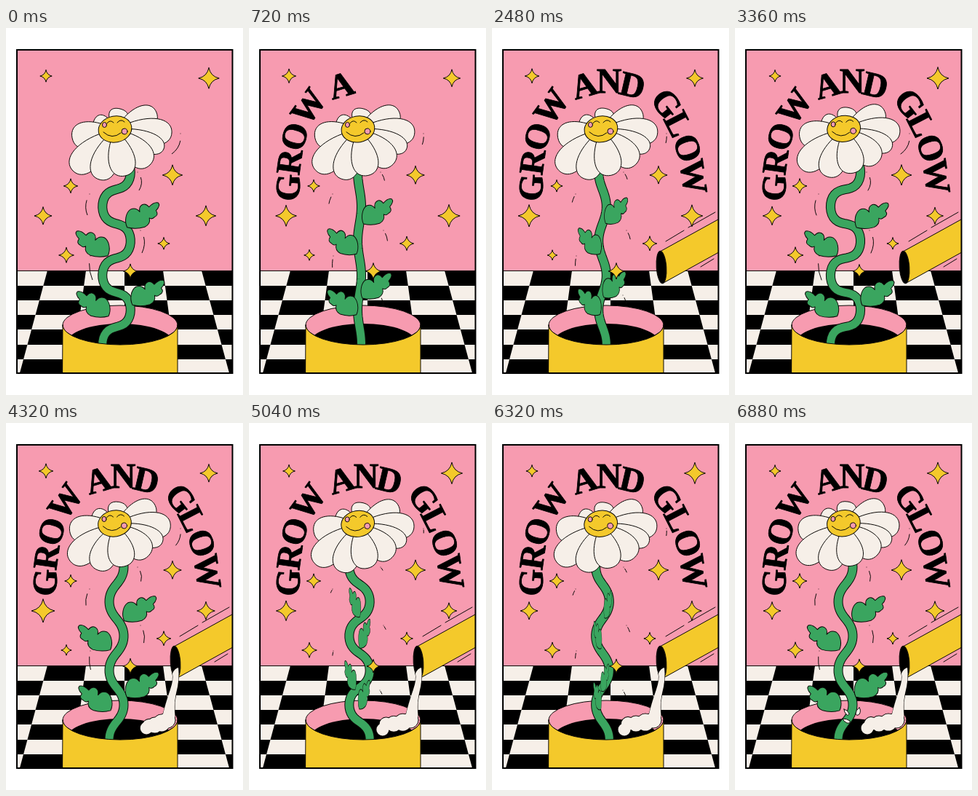
An HTML page for the animation above (6960 ms loop, 326x504 px).

```html
<!DOCTYPE html>
<html lang="en">
<head>
<meta charset="utf-8">
<title>Grow and glow</title>
<style>
  html, body { margin: 0; width: 100%; height: 100%; overflow: hidden; background: #fff; }
  svg { display: block; width: 100vw; height: 100vh; }
  text { font: bold 48px "Liberation Serif", "Noto Serif", serif; text-anchor: middle; stroke: #000; stroke-width: .8; }
  .ink { stroke: #0b0907; stroke-width: 1; stroke-linejoin: round; stroke-linecap: round; }
  .line { fill: none; }
  .cream { fill: #f6efe8; }
  .gold { fill: #f4c92b; }
  .pink { fill: #f79bb0; }
  .green { fill: #3aa55f; }
</style>
</head>
<body>
<svg viewBox="0 0 326 504">
  <defs>
    <clipPath id="poster"><rect x="15" y="30" width="296" height="444"/></clipPath>
    <clipPath id="rim"><ellipse cx="157" cy="408" rx="79" ry="27"/></clipPath>
    <clipPath id="mouth"><path d="M78 300H260V408H236A79 27 0 0 1 78 408Z"/></clipPath>
    <clipPath id="fall"><rect id="fallBox" x="180" y="325" width="90" height="0"/></clipPath>
    <path id="stream" d="M229 344Q231 351 226 366Q219 386 215 404L212 416L230 414Q233 404 232 396Q231 384 234 371Q239 352 237 336Q232 337 229 344Z"/>
    <mask id="sweep" maskUnits="userSpaceOnUse" x="0" y="0" width="326" height="504">
      <path id="sweepArc" fill="none" stroke="#fff" stroke-width="84"/>
    </mask>
  </defs>
  <g clip-path="url(#poster)">
    <rect class="pink" x="15" y="30" width="296" height="304"/>
    <rect class="cream" x="15" y="333" width="296" height="141"/>
    <path id="tiles" fill="#000"/>
    <path class="ink" d="M15 333.5H311"/>
    <g id="words" mask="url(#sweep)"></g>
    <g id="swing" class="ink line"></g>
    <ellipse class="ink pink" cx="157" cy="408" rx="79" ry="27"/>
    <ellipse cx="157" cy="433" rx="74" ry="27" clip-path="url(#rim)"/>
    <path id="stemEdge" fill="none" stroke="#0b0907" stroke-width="13"/>
    <path id="stem" fill="none" stroke="#3aa55f" stroke-width="11"/>
    <g id="leaves"></g>
    <path class="ink gold" d="M78 408A79 27 0 0 0 236 408V475H78Z"/>
    <g id="stars"></g>
    <g id="petals"></g>
    <g id="face" class="ink">
      <ellipse class="gold" cx="150" cy="139" rx="23" ry="18" transform="rotate(-10 150 139)"/>
      <ellipse class="pink" cx="135.5" cy="133" rx="3" ry="3.5"/>
      <ellipse class="pink" cx="163" cy="142" rx="4" ry="4"/>
      <path class="line" d="M139 131q4-6 9-1M153 130q5-6 10-1M134 143Q146 154 158 144"/>
    </g>
    <g id="tube" class="ink">
      <path class="gold" d="M232 306.500L330 252.500V298L235 350.500Z"/>
      <ellipse cx="233" cy="328.500" rx="6.800" ry="22.300" transform="rotate(-4 233 328.500)"/>
      <path class="line" d="M239 293L264 278M270 274L307 253M287 328L305 317"/>
    </g>
    <g clip-path="url(#mouth)">
      <g id="poolEdge" class="ink"></g>
      <use href="#stream" class="ink cream" clip-path="url(#fall)"/>
      <g id="pool" class="cream"></g>
      <use href="#stream" class="cream" clip-path="url(#fall)"/>
      <g id="drops" class="ink cream">
        <path d="M150 393q5 1 7 6q-1 4-4 1q-3-3-3-7z"/>
        <path d="M171 391q3 4 0 9q-4 3-5-1q0-5 5-8z"/>
        <path d="M148 406q6 0 10 3q1 4-4 3q-5-2-6-6z"/>
      </g>
    </g>
  </g>
  <rect x="15" y="30" width="296.500" height="444" fill="none" stroke="#000" stroke-width="2"/>
</svg>
<script>
const LOOP = 6960, STEP = 80;
const $ = id => document.getElementById(id);
const clamp = (v, lo = 0, hi = 1) => Math.min(hi, Math.max(lo, v));
const span = (t, from, to) => clamp((t - from) / (to - from));
const ease = p => (1 - Math.cos(Math.PI * p)) / 2;

function add(parent, name, attrs = {}) {
  const node = document.createElementNS("http://www.w3.org/2000/svg", name);
  for (const key in attrs) node.setAttribute(key, attrs[key]);
  return $(parent).appendChild(node);
}

function mix(keys, t) {
  const i = keys.findIndex(k => k[0] > t);
  if (i < 0) return keys[keys.length - 1][1];
  const [a, b] = [keys[i - 1], keys[i]];
  return a[1] + (b[1] - a[1]) * ease((t - a[0]) / (b[0] - a[0]));
}

// Checkered floor in perspective, symmetric about the poster's centre
function floorPath() {
  const rows = [333, 354, 374, 394, 414, 435, 455, 475];
  const at = (col, y) => 163 + col * 53 * (1 + (y - 333) * 0.00255);
  let d = "";
  for (let r = 0; r < 7; r++)
    for (let c = -4; c < 4; c++)
      if ((r + c) % 2 === 0) {
        const [y, z] = [rows[r], rows[r + 1]];
        d += `M${at(c, y)} ${y}H${at(c + 1, y)}L${at(c + 1, z)} ${z}H${at(c, z)}Z`;
      }
  return d;
}
$("tiles").setAttribute("d", floorPath());

// Lettering: glyph, centre, angle
[["G", 54, 219, -86], ["R", 56, 184, -82], ["O", 63, 149, -73], ["W", 82, 108, -54],
 ["A", 127, 79, -16], ["N", 161, 73, 0], ["D", 193, 79, 13],
 ["G", 240, 104, 52], ["L", 256, 132, 63], ["O", 269, 165, 71], ["W", 277, 204, 82]
].forEach(([glyph, x, y, turn]) => {
  add("words", "text", { transform: `translate(${x} ${y}) rotate(${turn})`, y: 15.5 }).textContent = glyph;
});

function arcTo(deg) {
  const point = a => `${165 + 112 * Math.sin(a * Math.PI / 180)} ${190 - 112 * Math.cos(a * Math.PI / 180)}`;
  return `M${point(-118)}A112 112 0 ${deg > 62 ? 1 : 0} 1 ${point(deg)}`;
}

// Stars: centre, mean radius, pulse, phase of the peak
const stars = [[55, 66, 9, 1, .4], [279, 69, 13.2, 1.8, .85], [229, 202, 13, 1, .88],
  [89, 217, 9, 1, .88], [51, 258, 14, 2, .47], [275, 258, 13, 2.3, .2],
  [217, 296, 9, 1, .4], [83, 312, 8.8, 2.2, .88], [171, 334, 10, 1, .3]
].map(s => [...s, add("stars", "path", { class: "ink gold", transform: `translate(${s[0]} ${s[1]})` })]);

const starPath = r => {
  const c = r * 0.17;
  return `M0 ${-r}Q${c} ${-c} ${r} 0Q${c} ${c} 0 ${r}Q${-c} ${c} ${-r} 0Q${-c} ${-c} 0 ${-r}Z`;
};

const swings = ["M240 145Q242 163 228 173", "M181 198Q191 210 183 223", "M115 228Q106 243 112 257",
  "M185 278Q195 292 187 309", "M116 313Q112 330 119 346", "M180 367Q189 380 181 397"
].map(d => add("swing", "path", { d, pathLength: 100 }));

// Petals from back to front: tip and half width
const petals = [[121, 127, 14], [157, 111, 16], [207, 116, 20], [228, 144, 22], [217, 166, 17],
  [91, 151, 22], [198, 188, 22], [92, 196, 23], [128, 208, 22], [164, 203, 22]
].map(p => [...p, add("petals", "path", { class: "ink cream" })]);

function petalPath(x, y, w) {
  const [cx, cy] = [150, 139], dx = x - cx, dy = y - cy, len = Math.hypot(dx, dy);
  const nx = -dy / len * w, ny = dx / len * w;
  return `M${cx} ${cy}C${cx + dx * .55 + nx * 1.2} ${cy + dy * .55 + ny * 1.2} ${x + nx} ${y + ny} ${x} ${y}` +
    `C${x - nx} ${y - ny} ${cx + dx * .55 - nx * 1.2} ${cy + dy * .55 - ny * 1.2} ${cx} ${cy}Z`;
}

function stemPoint(s, sway) {
  const a = 2 * Math.PI * (s - 198) / 94.5;
  return [152 + 22.5 * sway * Math.cos(a), s + 6.5 * sway * sway * Math.sin(2 * a)];
}

// Leaves: resting base, side, travel of the base with the sway
const leaves = [[158.5, 269.5, 1, 9.5, 5], [147, 310.5, -1, -8, 2.5],
  [158, 372, 1, 18.5, 9.5], [147, 394, -1, -7, 2]
].map(l => [...l, add("leaves", "path", {
  class: "ink green",
  d: "M0 0C-5-8-4-20 2-25Q9-29 15-23C12-32 20-38 27-31Q33-39 39-38Q43-35 37-27Q42-22 36-18Q33-14 29-16Q32-8 24-3Q12 2 0 0Z"
})]);

// Milk blobs: outlines first so that they merge
const blobs = [[222, 408, 11], [211, 411, 12], [198, 413, 11], [187, 413, 9.5], [182, 419, 9]]
  .map(b => [...b, add("poolEdge", "circle"), add("pool", "circle")]);

function drawMilk(t) {
  $("fallBox").setAttribute("height", 95 * span(t, 3640, 4080));
  const spread = .72 * ease(span(t, 4000, 4320)) + .28 * ease(span(t, 4320, 5300));
  const low = mix([[0, 0], [4320, 0], [5760, 4], [6880, 0]], t);
  $("pool").style.display = $("poolEdge").style.display = t > 4000 ? "" : "none";
  blobs.forEach(([x, y, r, edge, fill], i) => {
    const cx = 222 + (x - 222) * spread, cy = y + (i > 3 ? low : (1 - spread) * 3.5 * i);
    const size = r * clamp(spread * 3);
    for (const [node, radius] of [[edge, size], [fill, Math.max(0, size - .5)]]) {
      node.setAttribute("cx", cx);
      node.setAttribute("cy", cy);
      node.setAttribute("r", radius);
    }
  });
  $("drops").style.display = t >= 6560 ? "" : "none";
  $("drops").setAttribute("transform", `translate(0 ${8 * (1 - span(t, 6560, 6800))})`);
}

function draw(t) {
  const sway = -Math.cos(Math.PI * (t - 1640) / 1980);

  let d = "";
  for (let s = 186; s <= 442; s += 3) d += (d ? "L" : "M") + stemPoint(s, sway).map(v => v.toFixed(2)).join(" ");
  $("stem").setAttribute("d", d);
  $("stemEdge").setAttribute("d", d);

  const flip = Math.sin(Math.PI / 2 * clamp((sway + .5) * 1.9, -1, 1));
  for (const [x, y, side, dx, dy, node] of leaves)
    node.setAttribute("transform",
      `translate(${x + dx * sway} ${y + dy * sway}) scale(${side * flip} 1) rotate(${6 * flip})`);

  const reach = clamp((sway + .97) / 1.85) * 100;
  for (const line of swings) {
    line.style.display = reach > 1 ? "" : "none";
    line.setAttribute("stroke-dasharray", `0 ${reach * .32} ${reach * .68} 300`);
  }

  const lift = mix([[0, 0], [1440, .15], [2480, .1], [3360, .55], [4320, .85], [5760, .15], [6880, 1], [LOOP, 1]], t);
  for (const [x, y, w, node] of petals)
    node.setAttribute("d", petalPath(x - 2 * lift - (x < 100 ? 2 * lift : 0), y - lift * (y > 180 ? 7 : 3), w));
  $("face").setAttribute("transform", `translate(${-lift * .6} ${-lift * 1.2})`);

  for (const [, , r, pulse, peak, node] of stars)
    node.setAttribute("d", starPath(r + pulse * Math.cos(2 * Math.PI * (t / 576 - peak))));

  $("sweepArc").setAttribute("d", arcTo(Math.min(117, -117 + t * 214 / 1440)));

  const away = 1 - ease(span(t, 1150, 2200));
  $("tube").setAttribute("transform", `translate(${92 * away} ${-54 * away})`);
  $("tube").style.display = away < 1 ? "" : "none";
  drawMilk(t);
}

const start = performance.now();
function tick() {
  const t = (performance.now() - start) % LOOP;
  draw(Math.floor(t / STEP) * STEP);
  requestAnimationFrame(tick);
}
tick();
</script>
</body>
</html>
```
